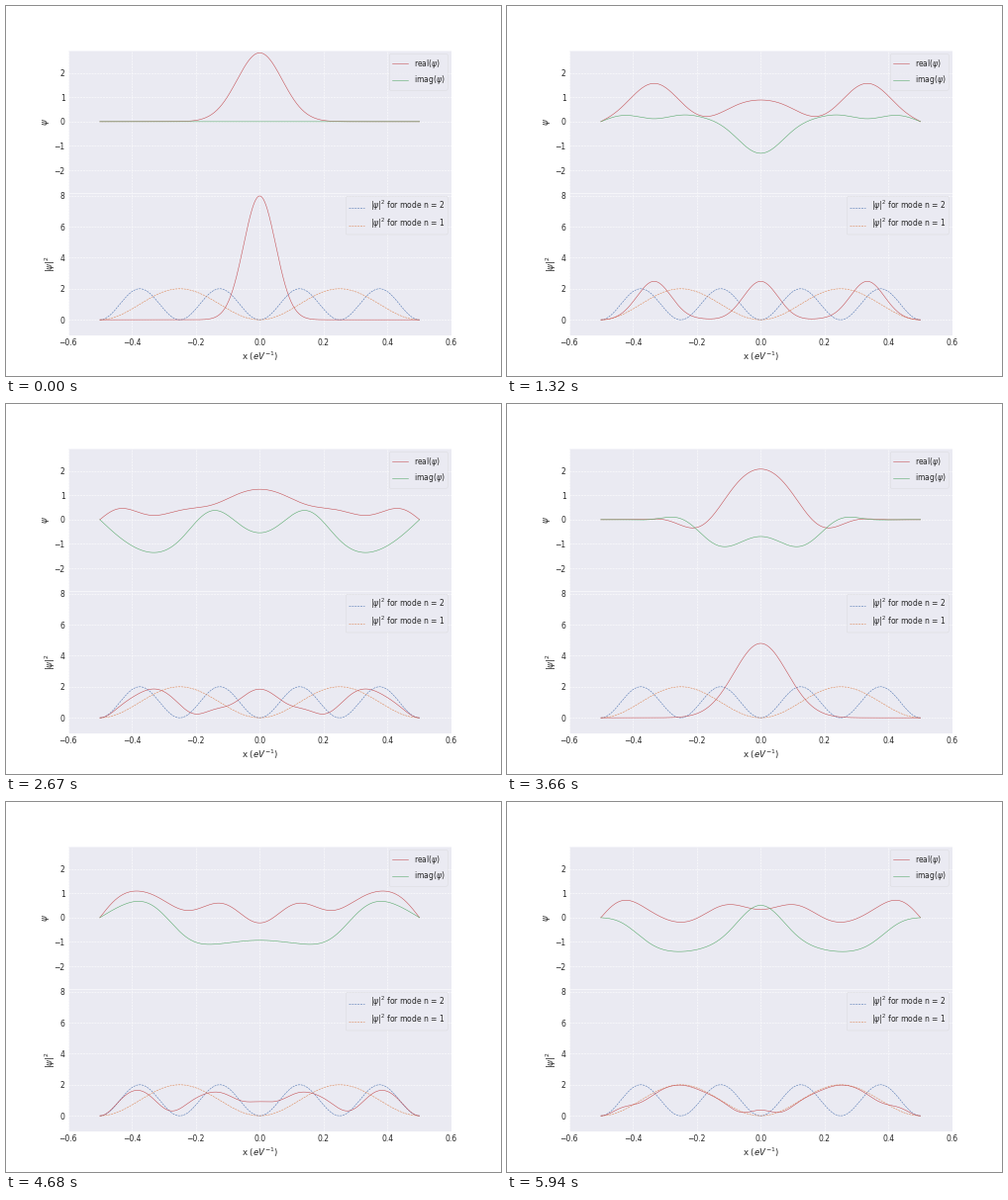
Recreate the animation shown at these times as a matplotlib script. Size 500 by 374 pixels, loop 5970 ms.

```python
import matplotlib.pyplot as plt
import numpy as np
from matplotlib.animation import FuncAnimation
from matplotlib.lines import Line2D
from matplotlib.patches import FancyBboxPatch

W, H, DPI = 500, 374, 64
PT = 78.125 / DPI                  # type and line unit
FRAMES, INTERVAL = 199, 30
DT = 0.00125                       # physical time per frame
SIGMA = 0.05                       # initial packet width

RED, GREEN, BLUE, ORANGE = "#C44E52", "#55A868", "#4C72B0", "#DD8452"
PANEL, INK = "#EAEAF2", "0.15"
SMALL, LABEL, THIN = 7 * PT, 8 * PT, 0.5 * PT

plt.rcParams.update({
    "font.family": "DejaVu Sans",
    "text.color": INK,
    "axes.labelcolor": INK,
    "axes.facecolor": PANEL,
    "axes.edgecolor": "white",
    "axes.linewidth": THIN,
    "axes.axisbelow": True,
    "axes.labelsize": LABEL,
    "axes.labelpad": 2.5 * PT,
    "grid.color": "white",
    "grid.linestyle": "--",
    "grid.linewidth": THIN,
    "xtick.labelsize": SMALL,
    "ytick.labelsize": SMALL,
})

# Gaussian packet in a unit box, expanded in the even eigenmodes
x = np.linspace(-0.5, 0.5, 501)
k = np.arange(1, 40, 2) * np.pi
energy = k**2 / 2
coef = 2 * (2 * np.pi * SIGMA**2) ** -0.25 * 2 * SIGMA * np.sqrt(np.pi) * np.exp(-(SIGMA * k) ** 2)
modes = np.cos(np.outer(x, k))


def psi(t):
    return modes @ (coef * np.exp(-1j * energy * t))


def curve(ax, y, color, style="-", z=2):
    return ax.plot(x, y, style, color=color, lw=THIN, zorder=z, snap=False)[0]


def legend(left, top, bottom, rows, line_up):
    """Framed key in pixel coordinates; rows are (baseline, label, color, style)."""
    fig.add_artist(FancyBboxPatch(
        (left, H - bottom), 446.2 - left, bottom - top,
        boxstyle="round,pad=0,rounding_size=1.5", transform=None,
        fc=PANEL, ec="0.8", lw=0.3 * PT, alpha=0.8, zorder=5))
    for base, label, color, style in rows:
        y = H - base
        fig.add_artist(Line2D([left + 3.2, left + 18.4], [y + line_up] * 2, color=color,
                              ls=style, lw=THIN, transform=None, zorder=6))
        fig.text(left + 24.6, y, label, size=SMALL, va="baseline",
                 transform=None, zorder=6)


fig, (top, low) = plt.subplots(2, 1, figsize=(W / DPI, H / DPI), dpi=DPI, facecolor="white")
fig.subplots_adjust(left=0.125, right=0.9, bottom=0.11, top=0.88, hspace=0)

for ax in (top, low):
    ax.set_xlim(-0.6, 0.6)
    ax.set_xticks(np.linspace(-0.6, 0.6, 7))
    ax.tick_params(length=0, pad=2.8 * PT, labelcolor=INK)
    ax.grid(True)
top.tick_params(labelbottom=False)

peak = abs(psi(0)).max()
top.set_ylim(-peak - 0.1, peak + 0.1)
top.set_yticks(range(-2, 3))
top.set_ylabel(r"$\psi$")
low.set_ylim(-1, peak**2 + 0.2)
low.set_yticks(range(0, 9, 2))
low.set_ylabel(r"$|\psi|^2$")
low.set_xlabel(r"x ($eV^{-1}$)")

real = curve(top, 0 * x, RED)
imag = curve(top, 0 * x, GREEN)
curve(low, 2 * np.sin(4 * np.pi * x) ** 2, BLUE, "--")
curve(low, 2 * np.sin(2 * np.pi * x) ** 2, ORANGE, "--")
density = curve(low, 0 * x, RED, z=3)

legend(387.2, 48.6, 85.2, [
    (60.8, r"real($\psi$)", RED, "-"),
    (77.4, r"imag($\psi$)", GREEN, "-"),
], 2.6)
legend(343.2, 192.6, 231, [
    (205.2, r"$|\psi|^2$ for mode n = 2", BLUE, "--"),
    (223.2, r"$|\psi|^2$ for mode n = 1", ORANGE, "--"),
], 1.7)


def update(i):
    wave = psi(i * DT)
    real.set_ydata(wave.real)
    imag.set_ydata(wave.imag)
    density.set_ydata(abs(wave) ** 2)
    return real, imag, density


anim = FuncAnimation(fig, update, frames=FRAMES, interval=INTERVAL,
                     repeat=True, repeat_delay=0, blit=False)
plt.show()
```
